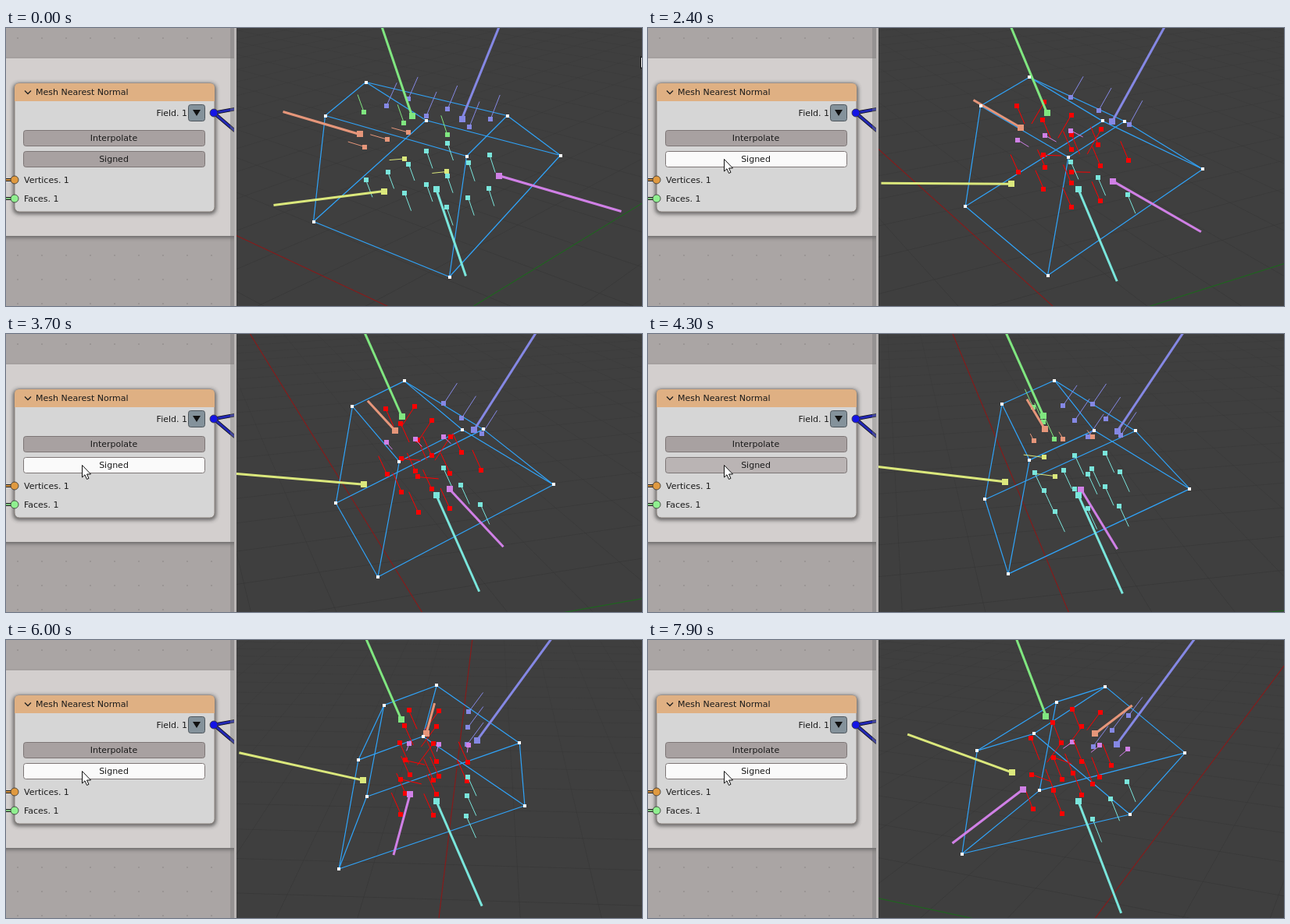
These frames come from a looping animation (814 by 357 pixels, 8 s). An HTML page with a canvas:

```html
<!DOCTYPE html>
<html lang="en">
<head>
<meta charset="utf-8">
<title>Mesh Nearest Normal</title>
<style>
  html, body { margin: 0; width: 100%; height: 100%; overflow: hidden; background: #3f3f3f; }
  canvas, svg { position: absolute; left: 0; top: 0; width: 814px; height: 357px; }
  text { font: 11px "DejaVu Sans", sans-serif; fill: #1a1a1a; }
  .mid { text-anchor: middle; }
  .button { stroke: #7d7676; rx: 3px; }
</style>
</head>
<body>
<canvas id="view" width="814" height="357"></canvas>
<svg viewBox="0 0 814 357">
  <defs>
    <pattern id="dots" x="0" y="0" width="31" height="31" patternUnits="userSpaceOnUse">
      <rect width="31" height="31" fill="#aaa5a4"/>
      <rect x="14" y="12" width="2" height="2" fill="#9a9594"/>
    </pattern>
    <filter id="soft" x="-10%" y="-10%" width="120%" height="120%"><feGaussianBlur stdDeviation="2.500"/></filter>
    <clipPath id="panel"><rect width="292" height="357"/></clipPath>
  </defs>
  <g clip-path="url(#panel)">
    <rect width="292" height="357" fill="url(#dots)"/>
    <rect x="-10" y="42" width="310" height="227" fill="#444" opacity=".7" filter="url(#soft)"/>
    <rect x="-10" y="39" width="310" height="228" fill="#d3cfce"/>
    <rect x="9" y="71" width="260" height="168" rx="7" fill="#333" opacity=".7" filter="url(#soft)"/>
    <rect x="11" y="71" width="256" height="165" rx="6" fill="#d6d6d6" stroke="#8d8580"/>
    <path d="M11 94V77q0-6 6-6H261q6 0 6 6V94Z" fill="#dfb083"/>
    <g fill="none">
      <path d="M266 109L293 104M266 109L293 132" stroke="#111" stroke-width="4.500"/>
      <path d="M266 109L293 104M266 109L293 132" stroke="#2328b4" stroke-width="3"/>
      <path d="M0 195H11M0 219H11" stroke="#222" stroke-width="4"/>
      <path d="M0 195H11" stroke="#c98a3c" stroke-width="2"/>
      <path d="M0 219H11" stroke="#7fc47f" stroke-width="2"/>
      <path d="M24 80.500l4 4 4-4" stroke="#222" stroke-width="1.300"/>
    </g>
    <g stroke="#333" stroke-width=".8">
      <circle cx="266" cy="109" r="5" fill="#1414e6"/>
      <circle cx="11" cy="195" r="5" fill="#e09a40"/>
      <circle cx="11" cy="219" r="5" fill="#90f090"/>
    </g>
    <rect x="233.500" y="98.500" width="21" height="21" rx="3" fill="#84929b" stroke="#4e565c"/>
    <path d="M239 105h10l-5 8z" fill="#111"/>
    <rect class="button" x="22.500" y="131.500" width="232" height="20" fill="#a8a1a1"/>
    <rect class="button" id="signed" x="22.500" y="158.500" width="232" height="20"/>
    <text x="38" y="86">Mesh Nearest Normal</text>
    <text x="232" y="113" text-anchor="end">Field. 1</text>
    <text class="mid" x="138" y="145">Interpolate</text>
    <text class="mid" x="138" y="172">Signed</text>
    <text x="23" y="199">Vertices. 1</text>
    <text x="23" y="223">Faces. 1</text>
    <rect x="287" width="5" height="357" fill="#777" opacity=".4"/>
  </g>
  <rect x="292" width="3" height="357" fill="#bab6b5"/>
  <path id="cursor" d="M.500 .500V16L4 12.800 6.500 18.500 9 17.400 6.500 12H11.500Z" fill="#fff" stroke="#111"/>
</svg>
<script>
const ctx = document.getElementById('view').getContext('2d');
const signedButton = document.getElementById('signed');
const cursor = document.getElementById('cursor');

// Turntable camera: every point circles the vertical axis at x = AXIS.
const AXIS = 550, HORIZON = -230, SCALE = 1149, LOOP = 8000;
const TURN_START = 500, DEGREES_PER_STEP = .954;
const RED = '#f00', GREEN = '#80e680', BLUE = '#8588e4', ORANGE = '#e6967a',
      YELLOW = '#dbe87c', CYAN = '#7ae6dc', MAGENTA = '#d080e6';

// A point from its place on screen at angle 0 and the height of its orbit's centre.
function place(x, y, centre) {
  const s = centre - HORIZON, w = s / (y - HORIZON);
  return { p: (x - AXIS) * w / SCALE, q: w - 1, s };
}
let cos = 1, sin = 0;
const turn = ({ p, q }) => ({ p: p * cos + q * sin, q: q * cos - p * sin });
const toScreen = ({ p, q }, s) => [AXIS + SCALE * p / (1 + q), HORIZON + s / (1 + q)];
const project = point => toScreen(turn(point), point.s);
const offset = (point, d, k) =>
  ({ p: point.p + d[0] * k, q: point.q + d[1] * k, s: point.s + d[2] * k });

const corners = [
  [460, 69, 88.4], [408, 112, 117.2], [589, 164, 116.1], [641, 112, 87],
  [537, 118, 166.1], [393, 248, 246.4], [567, 319, 245.5], [709, 163, 164.7]
].map(c => place(...c));

const faces = [
  [GREEN, [519, 112, 102], [461, -60, -73.5]],
  [BLUE, [583, 116, 127.8], [654, -60, -41]],
  [ORANGE, [452, 136, 155.7], [354, 107, 156.8]],
  [YELLOW, [483, 209, 182.1], [342, 227, 151.2]],
  [MAGENTA, [630, 189, 154.6], [787, 235, 153.2]],
  [CYAN, [550, 206, 206], [588, 318, 338.7]]
].map(([color, base, tip]) => ({ color, base: place(...base), tip: place(...tip) }));

// Offsets of the short normals, by face colour.
const normals = {
  [GREEN]: [-.0066, -.0074, -25.5], [BLUE]: [.0114, .0127, -27],
  [ORANGE]: [-.0212, .0192, .4], [YELLOW]: [-.0155, -.0166, -5],
  [CYAN]: [.0069, .0076, 26]
};

function faceOf(i, j, layer) {
  if (layer === 0) return i < 0 ? GREEN : BLUE;
  if (layer === 1 && j < 0) return ORANGE;
  return layer === 1 && i < 0 ? YELLOW : CYAN;
}

const samples = [];
[[115, 1], [160.4, .984], [203.7, .969]].forEach(([centre, k], layer) => {
  for (let j = -1; j <= 1; j++) for (let i = -1; i <= 1; i++) {
    samples.push({
      p: -.0109 + k * (.0243 * i + .0469 * j),
      q: .0085 + k * (.0266 * i - .0398 * j),
      s: centre - HORIZON,
      face: faceOf(i, j, layer),
      inside: i < 1 || layer === 1
    });
  }
});

function line(a, b, color, width) {
  ctx.strokeStyle = color;
  ctx.lineWidth = width;
  ctx.beginPath();
  ctx.moveTo(a[0] + .5, a[1] + .5);
  ctx.lineTo(b[0] + .5, b[1] + .5);
  ctx.stroke();
}

function square([x, y], size, color) {
  ctx.fillStyle = color;
  ctx.fillRect(Math.round(x - size / 2 + .5), Math.round(y - size / 2 + .5), size, size);
}

const FLOOR = 386 - HORIZON, X_AXIS = 138.8 * Math.PI / 180, UNIT = .095;
function floorLine(along, shift, color, width) {
  const c = Math.cos(along), s = Math.sin(along);
  const end = t => turn({ p: c * t - s * shift, q: s * t + c * shift });
  let a = end(-5), b = end(5);
  if (a.q > b.q) [a, b] = [b, a];
  const near = -.85;
  if (b.q <= near) return;
  if (a.q < near) {
    const k = (near - a.q) / (b.q - a.q);
    a = { p: a.p + (b.p - a.p) * k, q: near };
  }
  line(toScreen(a, FLOOR), toScreen(b, FLOOR), color, width);
}

const gridTone = ctx.createLinearGradient(0, 0, 0, 357);
gridTone.addColorStop(0, 'rgba(52,52,52,.25)');
gridTone.addColorStop(1, 'rgba(52,52,52,.6)');

function drawView(signed) {
  ctx.fillStyle = '#3f3f3f';
  ctx.fillRect(0, 0, 814, 357);
  for (let k = -20; k <= 20; k++) {
    if (!k) continue;
    floorLine(X_AXIS, k * UNIT, gridTone, 1);
    floorLine(X_AXIS - Math.PI / 2, k * UNIT, gridTone, 1);
  }
  floorLine(X_AXIS, 0, '#841c1c', 1.2);
  floorLine(X_AXIS - Math.PI / 2, 0, '#1f641f', 1.2);

  const v = corners.map(project);
  for (let i = 0; i < 4; i++) {
    const next = (i + 1) % 4;
    for (const [a, b] of [[i, next], [i + 4, next + 4], [i, i + 4]])
      line(v[a], v[b], '#30a4fa', 1.2);
  }
  for (const point of samples) {
    const flip = signed && point.inside;
    const color = !flip ? point.face : point.face === ORANGE ? MAGENTA : RED;
    const base = project(point);
    line(base, project(offset(point, normals[point.face], flip ? -1 : 1)), color, 1);
    square(base, 6, color);
  }
  for (const { color, base, tip } of faces) {
    line(project(base), project(tip), color, 3);
    square(project(base), 8, color);
  }
  v.forEach(c => square(c, 4, '#fff'));
}

const toggles = [2100, 3900, 5400, 6500, 7800];
const path = [[0, 812, 36], [100, 781, 46], [200, 751, 56], [400, 751, 56],
  [1300, 265, 150], [1500, 217, 163], [1900, 97, 168]];

function cursorAt(t) {
  const i = path.findIndex(k => k[0] > t);
  if (i < 0) return path[path.length - 1].slice(1);
  const a = path[i - 1], b = path[i], k = (t - a[0]) / (b[0] - a[0]);
  return [a[1] + (b[1] - a[1]) * k, a[2] + (b[2] - a[2]) * k];
}

function render(t) {
  const steps = Math.max(0, t - TURN_START) / 100;
  const angle = DEGREES_PER_STEP * steps * Math.PI / 180;
  cos = Math.cos(angle);
  sin = Math.sin(angle);
  const signed = toggles.filter(k => k <= t).length % 2 === 1;
  const [x, y] = cursorAt(t).map(Math.round);
  const hover = x > 22 && x < 255 && y > 157;
  drawView(signed);
  signedButton.style.fill = signed ? '#fafafa' : hover ? '#bab4b4' : '#a8a1a1';
  cursor.setAttribute('transform', `translate(${x} ${y})`);
}

const start = performance.now();
function tick() {
  const elapsed = Math.max(0, performance.now() - start) % LOOP;
  render(Math.floor(elapsed / 100) * 100);
  requestAnimationFrame(tick);
}
tick();
</script>
</body>
</html>
```
